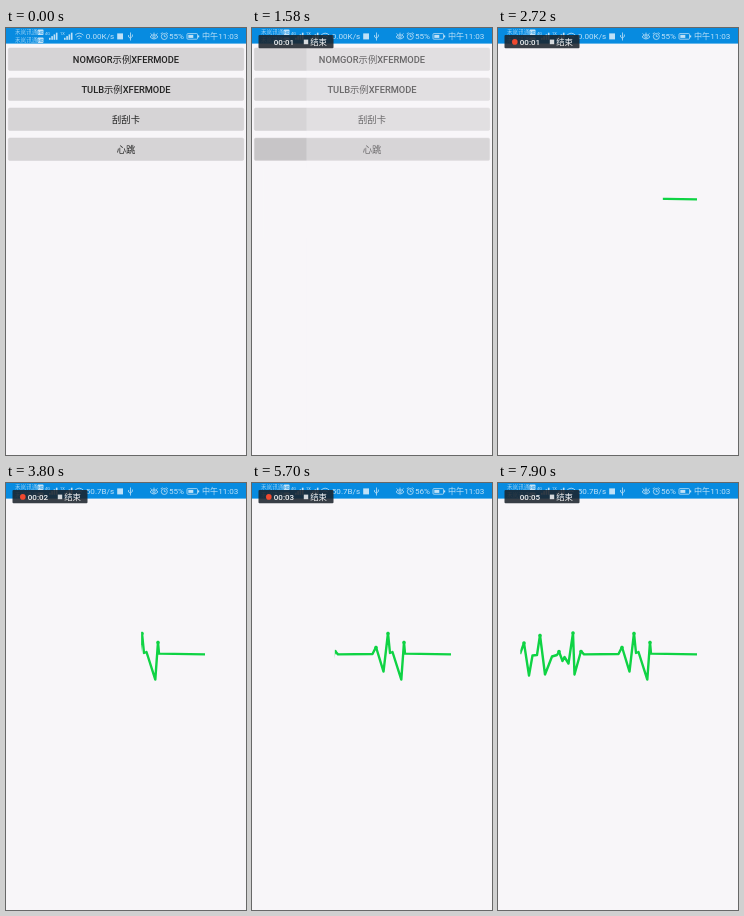
Write an HTML page that moves like this. It is 240 px wide and 427 px high and loops after 8000 ms.

```html
<!DOCTYPE html>
<html lang="zh">
<head>
<meta charset="utf-8">
<title>Heartbeat</title>
<style>
  html, body { margin: 0; width: 100%; height: 100%; overflow: hidden; background: #f8f6f9; }
  svg { display: block; width: 100vw; height: 100vh; font-family: Roboto, "Noto Sans CJK SC", "Noto Sans CJK", sans-serif; }
  .buttons rect { fill: #d6d4d6; stroke: #d0ced0; stroke-width: .5; }
  .buttons text { font-size: 9.3px; font-weight: 500; fill: #222; text-anchor: middle; }
  .bar { fill: #bfe1f7; font-size: 8.1px; }
  .bar .carrier { font-size: 5.6px; fill: #93cdf3; }
  .icon { fill: none; stroke: #bfe1f7; stroke-width: .8; }
  .panel { fill: #f4f5f6; font-size: 8.4px; animation: appear 8s linear infinite; }
  .bg { fill: #f8f6f9; }
  .trace { fill: none; stroke: #0fd344; stroke-width: 2.4; stroke-linejoin: round; }
  .peaks { fill: none; stroke: #0fd344; stroke-width: 3.6; stroke-linecap: round; }
  .page { animation: slide 8s infinite, fade 8s linear infinite; }
  .cover { animation: reveal 8s linear infinite; }
  .buttons .pressed { animation: press 8s linear infinite; }

  @keyframes appear { 0%, .25% { opacity: 0 } 3.5%, 100% { opacity: 1 } }
  @keyframes press { 0%, 13.5% { fill: #d6d4d6 } 16%, 100% { fill: #c7c5c7 } }
  @keyframes slide {
    0% { transform: translateX(240px); animation-timing-function: linear }
    18.25% { transform: translateX(240px); animation-timing-function: cubic-bezier(.215, .61, .355, 1) }
    22.25%, 100% { transform: none }
  }
  @keyframes fade { 0%, 18.5% { opacity: 0 } 22.25%, 100% { opacity: 1 } }
  @keyframes reveal {
    0%, 18.04% { transform: translateX(200px) }
    98.75%, 100% { transform: translateX(22.3px) }
  }
</style>
</head>
<body>
<svg viewBox="0 0 240 427" preserveAspectRatio="none">
  <rect class="bg" width="240" height="427"/>
  <g class="buttons" id="buttons"></g>

  <g class="page">
    <rect class="bg" y="15" width="240" height="412"/>
    <path class="trace" d="M199 171.4 153 170.6 152 159 149.3 196.6 140.5 169 138 170 136 150 131.5 188.6 124 164 120.5 171 86 171.4 83 168 76.5 191.5 75 150 70.5 180.5 66.5 174 64.5 178 61 168.5 59 172 54 173.5 47 191.5 42 152 39 172 34.5 172.5 31 192.5 26 160 22 171"/>
    <path class="peaks" d="M152 159.5h.01M136 150.5h.01M124 164.5h.01M83 168.5h.01M75 150h.01M61 168.5h.01M42 152.5h.01M26 160h.01"/>
    <rect class="bg cover" x="-240" y="140" width="240" height="70"/>
  </g>

  <g class="bar">
    <rect width="240" height="15.6" fill="#078be0"/>
    <g id="carriers"></g>
    <g id="signals"></g>
    <g class="icon">
      <path d="M69 7.2q4.2-4 8.4 0M70.6 9q2.6-2.4 5.2 0M72.2 10.8q1-1 2 0"/>
      <path d="M124.5 4.5v8M122.6 7v2l1.9 1.4M126.4 6.5v2l-1.9 1.4"/>
      <path d="M144 8.8q4-4.4 8 0q-4 4.4-8 0M144.6 5.4l1.2 1.4M148 4.6v1.6M151.4 5.4l-1.2 1.4"/>
      <circle cx="148" cy="8.8" r="1.2"/>
      <circle cx="158.3" cy="8.5" r="3"/>
      <path d="M158.3 6.6v2h1.5M154.8 6l1.6-1.6M161.8 6l-1.6-1.6"/>
      <rect x="181" y="5.6" width="10.5" height="5.6" rx=".8"/>
    </g>
    <rect x="182.3" y="6.9" width="5" height="3"/>
    <rect x="192" y="7.4" width="1.2" height="2"/>
    <rect x="111.2" y="5.4" width="5.8" height="6"/>
    <text id="speed" x="79.8" y="11.4"></text>
    <text id="battery" x="163" y="11.4"></text>
    <text x="196" y="11.4">中午11:03</text>
  </g>

  <g class="panel">
    <rect x="6.5" y="7" width="75" height="13.3" rx="1" fill="#1c232b" fill-opacity=".87"/>
    <circle id="dot" cx="16.8" cy="13.9" r="2.8" fill="#f0492f"/>
    <text id="timer" x="21.8" y="16.9" font-size="8" font-weight="500"></text>
    <rect x="51.8" y="11.6" width="4.4" height="4.6" fill="#d5d9dd"/>
    <text x="58.2" y="17">结束</text>
  </g>
</svg>
<script>
  const $ = id => document.getElementById(id);
  const LOOP = 8000;

  $('buttons').innerHTML = ['NOMGOR示例XFERMODE', 'TULB示例XFERMODE', '刮刮卡', '心跳']
    .map((label, i) => {
      const y = 20 + i * 30;
      return `<rect x="2.3" y="${y}" width="235.4" height="22.4" rx="1.5"${i === 3 ? ' class="pressed"' : ''}/>
        <text x="120" y="${y + 14.6}">${label}</text>`;
    }).join('');

  $('carriers').innerHTML = [6.4, 14.3].map(y =>
    `<text class="carrier" x="9" y="${y}">禾岚讯通</text>
     <rect x="31.5" y="${y - 4.8}" width="6" height="5.4" rx=".8"/>
     <text x="32.3" y="${y - .6}" font-size="3.8" style="fill:#078be0">HD</text>`).join('');

  $('signals').innerHTML = [[39, '4G'], [54, '1X']].map(([x, tag]) =>
    `<text x="${x}" y="7.4" font-size="4">${tag}</text>` +
    [0, 1, 2, 3].map(i =>
      `<rect x="${x + 4 + i * 2.3}" y="${9.8 - i * 1.7}" width="1.6" height="${2 + i * 1.7}"/>`).join('')
  ).join('');

  const ticks = [1080, 2780, 4500, 6140, 7780];
  const blinkOn = [0, 1960, 3600, 5320, 6960];
  const passed = (times, t) => times.filter(at => t >= at).length;

  function set(id, text) {
    if ($(id).textContent !== text) $(id).textContent = text;
  }

  function draw(t) {
    const seconds = passed(ticks, t);
    set('timer', '00:0' + seconds);
    set('speed', t < 3000 ? '0.00K/s' : '50.7B/s');
    set('battery', t < 4100 ? '55%' : '56%');
    $('dot').style.opacity = passed(blinkOn, t) > seconds ? 1 : 0;
  }

  let start;
  function frame(now) {
    start ??= now;
    draw((now - start) % LOOP);
    requestAnimationFrame(frame);
  }
  draw(0);
  requestAnimationFrame(frame);
</script>
</body>
</html>
```
